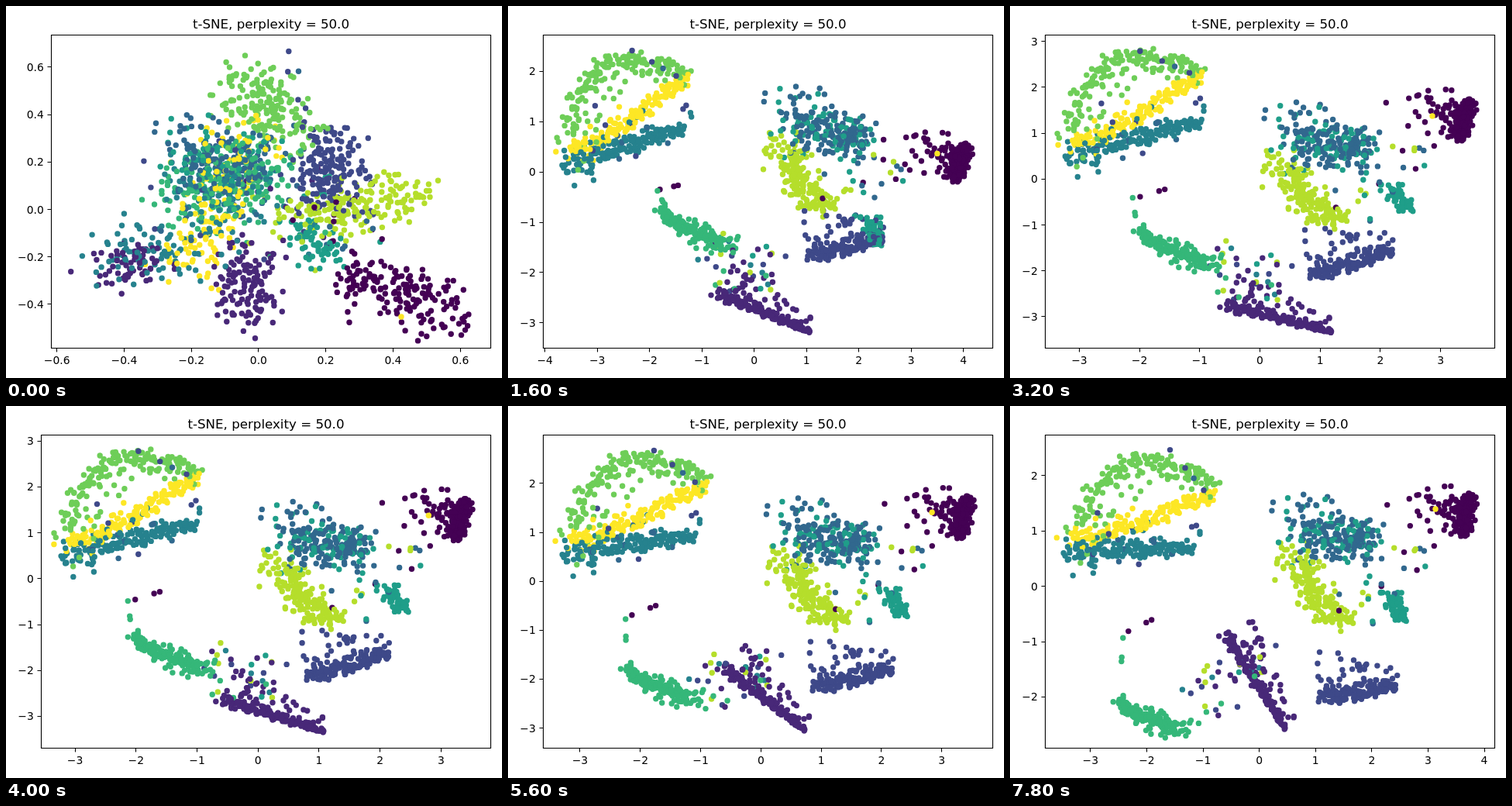
Recreate the animation shown at these times as an HTML page. Size 640x480 px, loop 8 s.

```html
<!DOCTYPE html>
<html lang="en">
<head>
<meta charset="utf-8">
<title>t-SNE scatter</title>
<style>
html, body { margin: 0; width: 100%; height: 100%; overflow: hidden; background: #fff; }
svg { display: block; width: 640px; height: 480px; }
text { font: 13.89px "DejaVu Sans", sans-serif; fill: #000; }
#title { font-size: 16.67px; text-anchor: middle; }
.x { text-anchor: middle; }
.y { text-anchor: end; }
path { fill: none; stroke: #000; stroke-width: 1.1; }
</style>
</head>
<body>
<svg viewBox="0 0 640 480">
  <g id="dots"></g>
  <path id="frame"/>
  <g id="ticks"></g>
  <text id="title" y="29">t-SNE, perplexity = 50.0</text>
</svg>
<script>
const $ = id => document.getElementById(id);
const LOOP = 8000, STEP = 200;
const TOP = 37.5, BOTTOM = 441.5, RIGHT = 625.5;
const COLORS = ['#440154', '#482878', '#3e4989', '#31688e', '#26828e',
  '#1f9e89', '#35b779', '#6ece58', '#b5de2b', '#fde725'];

let seed = 20;
function rand() {
  seed = (seed + 0x6D2B79F5) | 0;
  let t = Math.imul(seed ^ (seed >>> 15), 1 | seed);
  t = (t + Math.imul(t ^ (t >>> 7), 61 | t)) ^ t;
  return ((t ^ (t >>> 14)) >>> 0) / 4294967296;
}
const bell = () => (rand() + rand() + rand() - 1.5) * 2;
const lerp = (a, b, p) => a + (b - a) * p;
const easeOut = p => 1 - (1 - p) ** 2;
const smooth = p => p * p * (3 - 2 * p);
const linear = p => p;

// Segment of a key list and the eased progress in it
function locate(keys, eases, time) {
  let k = 0;
  while (k < keys.length - 2 && time >= keys[k + 1]) k++;
  return [k, eases[k]((time - keys[k]) / (keys[k + 1] - keys[k]))];
}

// A band is a bent, tapering line of points. Its ends (ax, ay, bx, by) are given
// for the start, the split, the settled layout and the end of the loop.
const BAND_KEYS = [0, 800, 3200, 7800], BAND_EASES = [easeOut, easeOut, smooth];
const bands = [], points = [];

function band(colors, n, { bend = 0, width = 0, tail = 0 }, startWidth, ...poses) {
  const b = { bend, width, tail, startWidth, poses };
  bands.push(b);
  for (let i = 0; i < n; i++) {
    points.push({
      b, u: (i + rand()) / n, gx: bell(), gy: bell(),
      far: Math.min(4, Math.log(1 - rand()) ** 2 / 2),
      color: COLORS[colors[Math.floor(rand() * colors.length)]]
    });
  }
}

// Main clusters
band([0], 170, { width: 5, tail: 16 }, 20,
  [575, 398, 445, 345], [570, 288, 592, 255], [577, 170, 598, 125], [582, 164, 598, 117]);
band([7], 180, { bend: 57, width: 5, tail: -10 }, 21,
  [300, 98, 375, 165], [78, 172, 212, 88], [73, 160, 247, 82], [84, 152, 266, 100]);
band([9], 160, { bend: -5, width: 7 }, 24,
  [235, 340, 315, 170], [82, 202, 212, 97], [82, 182, 247, 90], [80, 172, 264, 114]);
band([6], 165, { bend: 8, width: 6 }, 26,
  [345, 205, 230, 245], [318, 275, 234, 228], [265, 328, 166, 289], [225, 412, 140, 380]);
band([2], 175, { bend: -5, width: 4, tail: 10 }, 24,
  [410, 180, 425, 245], [390, 290, 470, 280], [390, 345, 493, 316], [402, 374, 497, 362]);
band([3, 3, 5], 235, { bend: 8, width: 17 }, 24,
  [230, 192, 330, 210], [370, 125, 455, 165], [365, 175, 460, 190], [375, 165, 465, 180]);
band([5], 58, { width: 6 }, 13,
  [370, 290, 425, 325], [437, 332, 430, 362], [490, 238, 517, 262], [490, 248, 508, 275]);
band([8], 170, { bend: -15, width: 11 }, 17,
  [370, 280, 535, 240], [365, 150, 402, 240], [350, 202, 430, 275], [368, 192, 438, 278]);

// Two clusters that each begin as two clouds
const teal = [[73, 222, 200, 170], [74, 196, 245, 150], [72, 190, 235, 184]];
band([4], 90, { bend: 3, width: 5, tail: -3 }, 19, [120, 322, 280, 302], ...teal);
band([4], 80, { bend: 3, width: 7, tail: 3 }, 27, [240, 235, 300, 240], ...teal);
const streak = [[258, 352, 358, 421], [278, 387, 415, 421], [277, 295, 355, 417]];
band([1], 125, { width: 2, tail: 7 }, 22, [305, 330, 318, 390], ...streak);
band([1], 60, { width: 2 }, 15, [125, 335, 190, 340], ...streak);

// Loose mixtures
band([1, 2, 4, 5, 6, 8], 38, { width: 18 }, 35,
  [300, 250, 420, 280], [260, 310, 340, 330], [260, 330, 355, 360], [235, 375, 335, 320]);
band([4, 4, 3, 2], 22, { width: 17 }, 28,
  [180, 285, 300, 190], [90, 180, 220, 145], [90, 180, 255, 125], [85, 180, 250, 160]);
band([5, 3, 8, 0], 24, { width: 17 }, 22,
  [390, 250, 480, 300], [410, 210, 480, 250], [435, 260, 545, 180], [440, 265, 545, 180]);

for (let i = points.length - 1; i > 0; i--) {
  const j = Math.floor(rand() * (i + 1));
  [points[i], points[j]] = [points[j], points[i]];
}

// Strays on top
band([0], 3, {}, 10,
  [400, 270, 420, 260], [230, 225, 250, 225], [165, 247, 215, 232], [150, 292, 197, 269]);
band([6], 3, {}, 10,
  [190, 270, 205, 255], [235, 227, 252, 232], [158, 245, 163, 280], [146, 296, 143, 342]);
band([2, 3], 4, {}, 8,
  [374, 60, 380, 110], [150, 56, 200, 96], [167, 58, 233, 87], [206, 56, 251, 110]);
band([9], 1, {}, 0,
  [510, 401, 510, 401], [565, 251, 565, 251], [545, 142, 545, 142], [549, 133, 549, 133]);

for (const p of points) {
  p.el = document.createElementNS('http://www.w3.org/2000/svg', 'circle');
  p.el.setAttribute('r', 3.7);
  p.el.setAttribute('fill', p.color);
  $('dots').append(p.el);
}

function drawDots(time) {
  const [k, p] = locate(BAND_KEYS, BAND_EASES, time);
  const form = k ? 1 : p;
  for (const b of bands) {
    const [ax, ay, bx, by] = b.poses[k].map((v, i) => lerp(v, b.poses[k + 1][i], p));
    const dx = bx - ax, dy = by - ay, len = Math.hypot(dx, dy) || 1;
    Object.assign(b, { ax, ay, dx, dy, nx: dy / len, ny: -dx / len });
  }
  for (const { b, u, gx, gy, far, el } of points) {
    const taper = lerp(1, 1.4 - .8 * u, form);
    const spread = lerp(b.startWidth, b.width, form) * taper;
    const off = form * (b.bend * 4 * u * (1 - u) + b.tail * far * taper);
    el.setAttribute('cx', (b.ax + b.dx * u + b.nx * off + spread * gx).toFixed(1));
    el.setAttribute('cy', (b.ay + b.dy * u + b.ny * off + spread * gy).toFixed(1));
  }
}

// Pixel position of zero and pixels per unit, for each axis
const AXIS_KEYS = [0, 800, 1600, 3200, 4800, 6400, 7800];
const AXIS_EASES = AXIS_KEYS.map((_, i) => i ? linear : easeOut);
const axes = {
  x0: [325.9, 316, 317.7, 322.5, 328, 324.7, 321.6],
  y0: [262.5, 222.3, 214.1, 223.3, 222.4, 230, 232.6],
  sx: [433.8, 62, 67.5, 77.7, 79.75, 75.9, 72.6],
  sy: [306, 72, 64.9, 59.2, 59.2, 67.3, 71.4]
};

const tickStep = range => [.1, .2, .25, .5, 1, 2].find(s => range / s <= 9) || 5;
const decimals = s => s >= 1 ? 0 : s === .25 ? 2 : 1;

function tickList(zero, scale, lo, hi, step) {
  const out = [];
  for (let i = Math.ceil((lo - zero) / scale / step); zero + i * step * scale <= hi; i++) {
    const v = i * step;
    out.push([zero + v * scale, (v < 0 ? '\u2212' : '') + Math.abs(v).toFixed(decimals(step))]);
  }
  return out;
}

function drawAxes(time) {
  const [k, p] = locate(AXIS_KEYS, AXIS_EASES, time);
  const zero = v => lerp(v[k], v[k + 1], p);
  const scale = v => v[k] * (v[k + 1] / v[k]) ** p;
  const sx = scale(axes.sx), sy = scale(axes.sy);
  const yStep = tickStep((BOTTOM - TOP) / sy);
  const left = [45.5, 58.5, 67.5][decimals(yStep)];
  const xStep = tickStep((RIGHT - left) / sx);
  let lines = `M${left} ${TOP}H${RIGHT}V${BOTTOM}H${left}Z`, labels = '';
  for (const [x, s] of tickList(zero(axes.x0), sx, left, RIGHT, xStep)) {
    lines += `M${Math.floor(x) + .5} ${BOTTOM}v5`;
    labels += `<text class="x" x="${x}" y="462">${s}</text>`;
  }
  // Values grow upwards, so y runs negated
  for (const [y, s] of tickList(-zero(axes.y0), sy, -BOTTOM, -TOP, yStep)) {
    lines += `M${left} ${Math.floor(-y) + .5}h-5`;
    labels += `<text class="y" x="${left - 9.7}" y="${Math.round(-y + 5)}">${s}</text>`;
  }
  $('frame').setAttribute('d', lines);
  $('ticks').innerHTML = labels;
  $('title').setAttribute('x', (left + RIGHT) / 2);
}

let shown = -1;
const start = performance.now();
function tick() {
  const step = Math.floor((performance.now() - start) % LOOP / STEP);
  if (step !== shown) {
    shown = step;
    drawDots(step * STEP);
    drawAxes(step * STEP);
  }
  requestAnimationFrame(tick);
}
tick();
</script>
</body>
</html>
```
